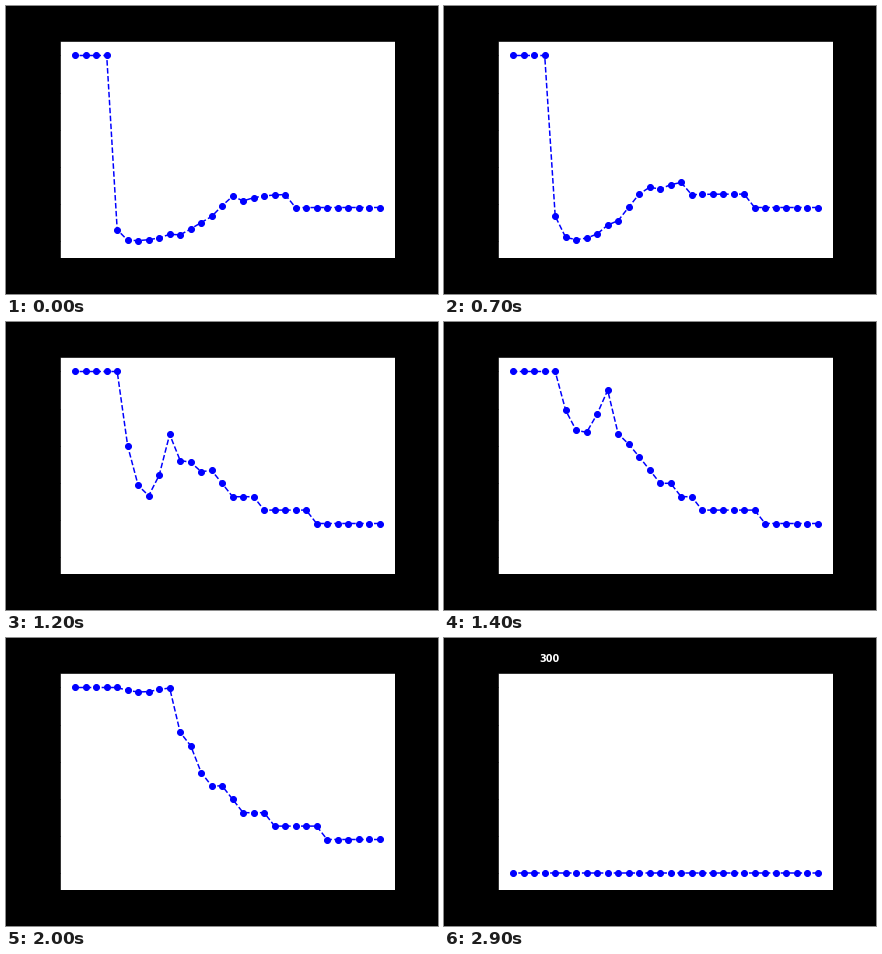
A matplotlib script for the animation above (3000 ms loop, 432 by 288 pixels).

```python
import numpy as np
import matplotlib.pyplot as plt
from matplotlib.animation import FuncAnimation

W, H, DPI = 432, 288, 72
FRAMES, INTERVAL = 30, 100
HIGH, LOW, REST = 49, 235, 201     # levels in pixels from the top
STAIR = 13.4                       # height of one stair in the decay
COLLAPSE = 23                      # step at which the curve drops flat

X = np.arange(30)
KEYS = [0, 7, 12, 16]              # steps at which the dip's shape is set


def ease(step, *values):
    return np.interp(step, KEYS, values)


def decay(step):
    """High plateau, then an exponential fall in stairs to the resting level."""
    rise = 97 * np.exp(-(X - 10 - 0.15 * (step - 16)) / 5)
    stairs = REST - STAIR * np.round(rise / STAIR)
    return np.where(X < 10, HIGH, np.maximum(stairs, HIGH))


def dip(step):
    """Share (0..1) by which each point is pulled towards the low level."""
    start = ease(step, 3, 3, 4, 4)
    soft = ease(step, 0.36, 0.5, 1.9, 1.9)
    end = ease(step, 13.5, 11.8, 8.5, 7.5)
    width = ease(step, 1.4, 1.2, 0.9, 0.6)
    depth = ease(step, 1, 1, 1, 0.04)
    fall = 1 - np.exp(-np.maximum(X - start, 0) / soft)
    recover = 1 / (1 + np.exp((X - end) / width))
    return depth * fall * recover


def heights(step):
    if step >= COLLAPSE:
        return np.full(X.size, LOW)
    base = decay(step)
    return base + (LOW - base) * dip(step)


fig = plt.figure(figsize=(W / DPI, H / DPI), dpi=DPI, facecolor="black")
ax = fig.add_axes([0.125, 0.125, 0.775, 0.755])
ax.set(xlim=(-1.45, 30.45), ylim=(252, 34.56), xticks=[],
       yticks=np.linspace(HIGH, LOW, 6) + 0.5, yticklabels=[])
line, = ax.plot([], [], "bo--", lw=1.5, ms=6)
label = fig.text(95 / W, 1 - 24 / H, "300", color="white", size=9.8,
                 weight="bold", family="DejaVu Sans")


def update(step):
    # The sweep runs from right to left, so the dashes start at the right end
    line.set_data(X[::-1], heights(step)[::-1] + 0.5)
    label.set_visible(step == FRAMES - 1)
    return line, label


anim = FuncAnimation(fig, update, frames=FRAMES, interval=INTERVAL,
                     repeat=True, repeat_delay=0, blit=False)
plt.show()
```
